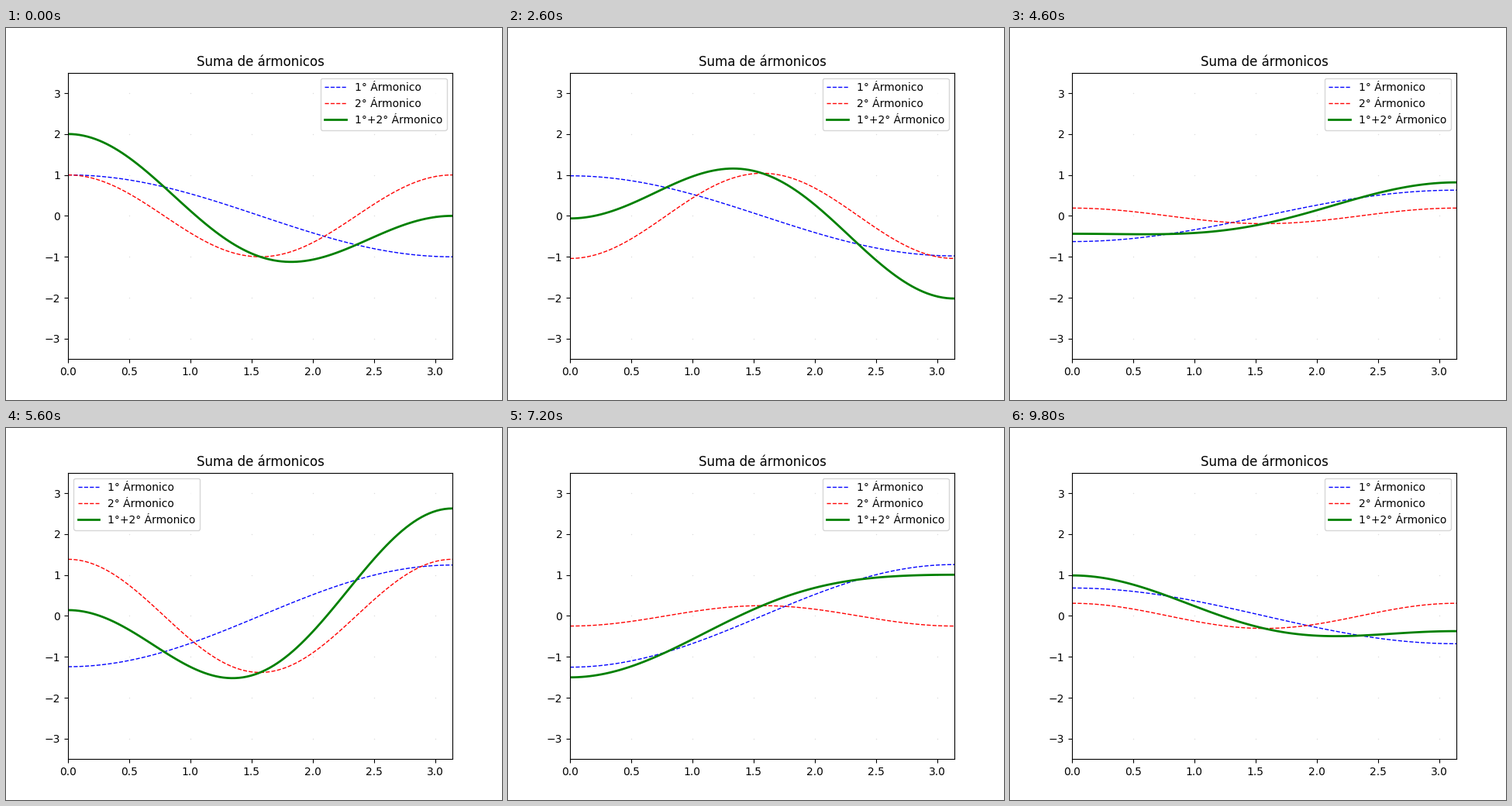
Write a matplotlib script that moves like this. It is 640x480 px and loops after 10 s.

```python
import numpy as np
import matplotlib.pyplot as plt
from matplotlib.animation import FuncAnimation

FRAMES = 50
times = np.linspace(0, 6, FRAMES)
x = np.linspace(0, np.pi, 100)


def harmonic(n, t):
    return (np.cos(n * t) + np.sin(n * t)) * np.cos(n * x)


plt.rcParams["font.family"] = "DejaVu Sans"
fig, ax = plt.subplots(figsize=(6.4, 4.8), dpi=100)
ax.set_title("Suma de ármonicos")
ax.set_xlim(0, np.pi)
ax.set_ylim(-3.5, 3.5)

# faint dots where the grid lines would cross
gx, gy = np.meshgrid(np.arange(0.5, 3.1, 0.5), np.arange(-3, 4))
ax.scatter(gx, gy, s=1, c="#dcdcdc", linewidths=0, zorder=0.5)

first, = ax.plot(x, harmonic(1, 0), "b--", lw=1, label="1° Ármonico")
second, = ax.plot(x, harmonic(2, 0), "r--", lw=1, label="2° Ármonico")
total, = ax.plot(x, harmonic(1, 0) + harmonic(2, 0), "g", lw=2,
                 label="1°+2° Ármonico")


def place_legend(y):
    """Move the legend to the left when the sum rises into its corner."""
    crowded = np.any((x > 2.05) & (y > 2.08))
    ax.legend(loc="upper left" if crowded else "upper right")


def update(i):
    y1, y2 = harmonic(1, times[i]), harmonic(2, times[i])
    first.set_ydata(y1)
    second.set_ydata(y2)
    total.set_ydata(y1 + y2)
    place_legend(y1 + y2)
    return first, second, total


anim = FuncAnimation(fig, update, frames=FRAMES, interval=200,
                     repeat=True, repeat_delay=0, blit=False)
plt.show()
```
